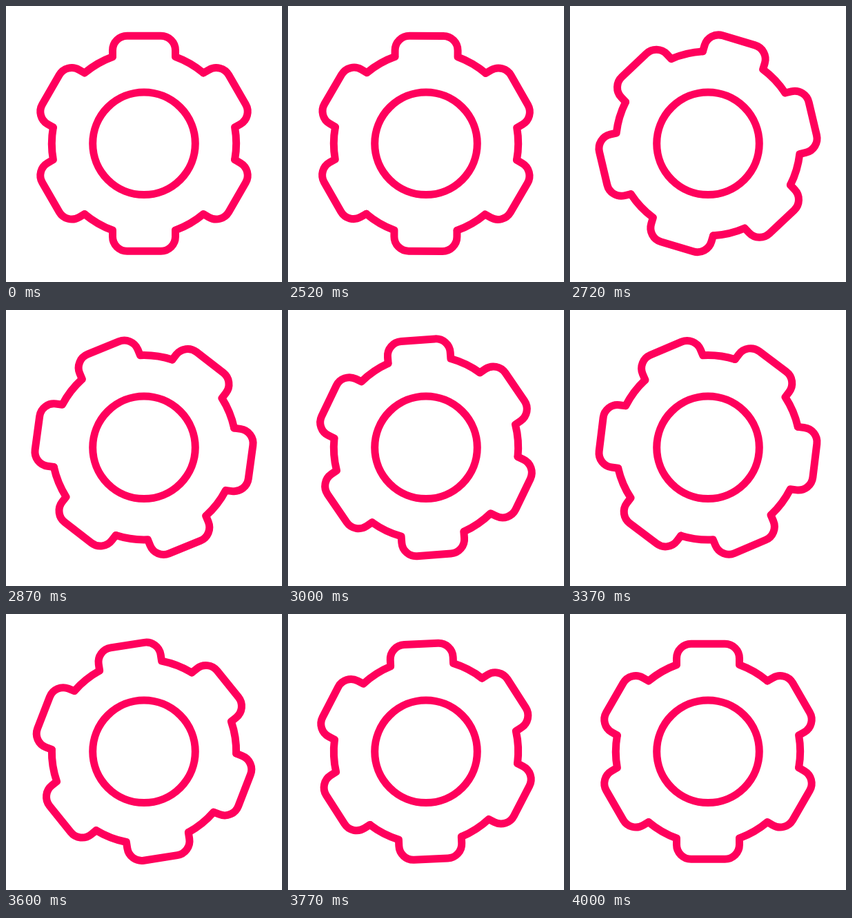
An HTML page that plays this animation: 400 px wide and 400 px high, repeating every 4.02 s.

```html
<!DOCTYPE html>
<html lang="en">
<head>
<meta charset="utf-8">
<title>Turning gear</title>
<style>
  html, body { margin: 0; width: 100%; height: 100%; overflow: hidden; background: #fff; }
  svg { display: block; width: 100%; height: 100%; }
</style>
</head>
<body>
<svg viewBox="0 0 400 400">
  <g transform="translate(200 199.3)" fill="none" stroke="#ff005c" stroke-width="11"
     stroke-linecap="round" stroke-linejoin="round">
    <circle r="74.3"/>
    <g id="gear">
      <path id="tooth" d="M-45.5-125.7V-135a21 21 0 0 1 21-21h49a21 21 0 0 1 21 21v9.3A133.7 133.7 0 0 1 85.9-102.4"/>
      <use href="#tooth" transform="rotate(60)"/>
      <use href="#tooth" transform="rotate(120)"/>
      <use href="#tooth" transform="rotate(180)"/>
      <use href="#tooth" transform="rotate(240)"/>
      <use href="#tooth" transform="rotate(300)"/>
    </g>
  </g>
</svg>
<script>
const LOOP = 4020, START = 2500, DURATION = 1500, TURN = 120, STEP = 25;
const gear = document.getElementById('gear');

// Cubic bezier easing (x1, 0, x2, 1), solved by bisection.
function ease(x, x1 = 0.21, x2 = 0.402) {
  let low = 0, high = 1;
  for (let i = 0; i < 30; i++) {
    const s = (low + high) / 2, r = 1 - s;
    if (3 * x1 * s * r * r + 3 * x2 * s * s * r + s * s * s < x) low = s;
    else high = s;
  }
  return low * low * (3 - 2 * low);
}

// The motion advances in 25 ms steps on a 10 ms clock.
function stepped(time) {
  return Math.floor((Math.floor(time / 10) * 10 + 5) / STEP) * STEP;
}

function draw(now) {
  const progress = (stepped(now % LOOP) - START) / DURATION;
  const angle = progress <= 0 || progress >= 1 ? 0 : TURN * ease(progress);
  gear.setAttribute('transform', `rotate(${angle})`);
}

const begin = performance.now();
function tick() {
  draw(performance.now() - begin);
  requestAnimationFrame(tick);
}
tick();
</script>
</body>
</html>
```
